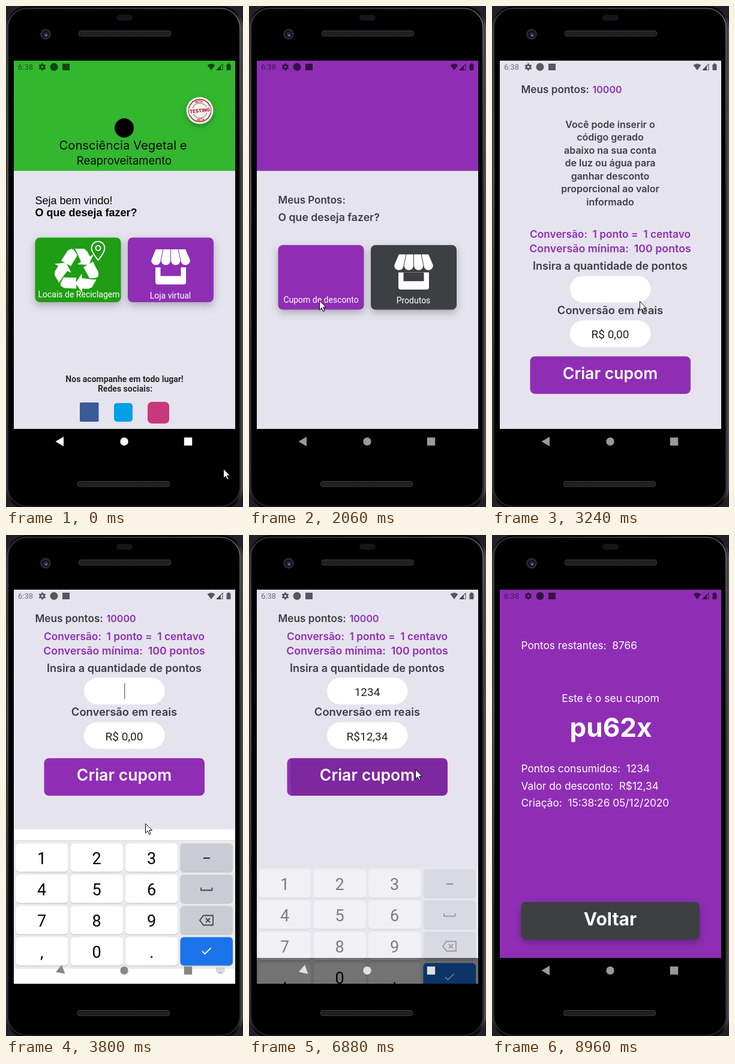
These frames come from a looping animation (395 by 834 pixels, 9.04 s). An HTML page with a canvas:

```html
<!DOCTYPE html>
<html lang="pt-BR">
<head>
<meta charset="utf-8">
<title>Cupom de desconto</title>
<style>
html, body { margin: 0; width: 100%; height: 100%; overflow: hidden; background: #20202a; }
canvas { display: block; }
</style>
</head>
<body>
<canvas id="stage" width="395" height="834"></canvas>
<script>
const stage = document.getElementById('stage');
let c = stage.getContext('2d');
const LOOP = 9040, LEFT = 13, TOP = 91, W = 369, H = 613, BOTTOM = 747;
const PURPLE = '#8f2eb5', GREEN = '#1f9d14', DARK = '#3c4043', PAGE = '#e5e4ee', INK = '#3d3d42';
const POP = 'Inter, sans-serif', ROB = 'Roboto, sans-serif', ARI = '"Liberation Sans", Arial, sans-serif';
const PARAGRAPH = 211.7; // height of the help text hidden while the keyboard is up

const clamp = x => Math.max(0, Math.min(1, x));
const span = (t, a, b) => clamp((t - a) / (b - a));
const lerp = (a, b, k) => a + (b - a) * k;

// cubic-bezier(.208, .82, .25, 1)
function ease(x) {
  if (x <= 0 || x >= 1) return clamp(x);
  const f = (s, a, b) => 3 * a * s * (1 - s) ** 2 + 3 * b * s * s * (1 - s) + s ** 3;
  let lo = 0, hi = 1;
  for (let i = 0; i < 24; i++) {
    const m = (lo + hi) / 2;
    if (f(m, .208, .25) < x) lo = m; else hi = m;
  }
  return f(lo, .82, 1);
}

function text(s, x, y, font, color, align = 'center') {
  c.font = font;
  c.fillStyle = color;
  c.textAlign = align;
  c.fillText(s, x, y);
}
function rect(x, y, w, h, color) {
  c.fillStyle = color;
  c.fillRect(x, y, w, h);
}
function round(x, y, w, h, r, color) {
  c.beginPath();
  c.roundRect(x, y, w, h, r);
  c.fillStyle = color;
  c.fill();
}
function disc(x, y, r, color) {
  c.beginPath();
  c.arc(x, y, r, 0, 7);
  c.fillStyle = color;
  c.fill();
}
function path(points, closed = true) {
  c.beginPath();
  points.forEach(p => c.lineTo(...p));
  if (closed) c.closePath();
}
function line(points, color, width, closed = false) {
  path(points, closed);
  c.strokeStyle = color;
  c.lineWidth = width;
  c.stroke();
}
function poly(points, color) {
  path(points);
  c.fillStyle = color;
  c.fill();
}
function group(draw) {
  c.save();
  draw();
  c.restore();
}
function clip(x, y, w, h, r = 0) {
  c.beginPath();
  c.roundRect(x, y, w, h, r);
  c.clip();
}
function shadow(blur, dy, alpha) {
  c.shadowColor = `rgba(0,0,0,${alpha})`;
  c.shadowBlur = blur;
  c.shadowOffsetY = dy;
}

// Raised button; press = [time since touch, x, y]
function card(x, y, w, h, r, color, press, raised = true) {
  group(() => {
    if (raised) shadow(13, 5, .26);
    round(x, y, w, h, r, color);
  });
  if (press && press[0] > 0) group(() => {
    clip(x, y, w, h, r);
    disc(press[1], press[2], press[0] * 1.39, 'rgba(0,0,0,.12)');
  });
}

function phone() {
  rect(0, 0, 395, 834, '#20202a');
  const rim = c.createLinearGradient(0, 0, 395, 0);
  [[0, '#3c3c3c'], [.01, '#222'], [.025, '#0a0a0a'], [.97, '#0a0a0a'], [.985, '#262626'], [1, '#555']]
    .forEach(s => rim.addColorStop(...s));
  round(0, 0, 395, 838, 36, rim);
  const edge = c.createLinearGradient(0, 0, 300, 400);
  edge.addColorStop(0, '#484848');
  edge.addColorStop(.5, '#8a8a8a');
  edge.addColorStop(1, '#333');
  round(3, 4, 387, 829, 32, '#050505');
  c.strokeStyle = edge;
  c.lineWidth = 1.2;
  c.stroke();
  round(6, 8, 381, 822, 30, '#000');
  round(184, 14.5, 27, 10, 5, '#161618');
  disc(66, 47, 9, '#29292d');
  disc(66, 47, 6, '#10131c');
  disc(66.5, 47.5, 3.5, '#22304f');
  disc(67, 49, 1.3, '#8fa9d8');
  for (const [x, y] of [[121.5, 41.5], [119.5, 791.5]]) {
    round(x, y, 153, 8.5, 3.5, '#191919');
    c.strokeStyle = '#474747';
    c.lineWidth = 1;
    c.stroke();
    for (let i = 4; i < 150; i += 3) rect(x + i, y + 2.5, 1.3, 3.5, '#303030');
  }
}

function badge() {
  const red = '#a3222d';
  group(() => {
    shadow(8, 3, .3);
    disc(323, 174, 22.5, '#f4f2f0');
  });
  group(() => {
    c.translate(323, 174);
    c.rotate(-.1);
    c.strokeStyle = red;
    for (const r of [18.5, 12.5]) {
      c.beginPath();
      c.arc(0, 0, r, 0, 7);
      c.lineWidth = r > 15 ? 1.5 : .8;
      c.stroke();
    }
    text('BETA', 0, -13.2, `700 5px ${ROB}`, red);
    text('BETA', 0, 17, `700 5px ${ROB}`, red);
    rect(-18, -5, 36, 10, '#f4f2f0');
    text('TESTING', 0, 3, `800 8.2px ${ROB}`, red);
  });
}

function recycle(x, y) {
  group(() => {
    c.translate(x, y);
    for (let i = 0; i < 3; i++) {
      poly([[-26, -16], [-15, -33], [-9, -36], [-5, -34], [1, -25], [-10, -7]], '#fff');
      poly([[-3, -36], [12, -36], [17, -32], [22, -23], [28, -27], [20, -9], [1, -10], [7, -14], [2, -26]], '#fff');
      c.rotate(Math.PI * 2 / 3);
    }
  });
}

function pin(x, y) {
  c.beginPath();
  c.arc(x, y, 11, 2.75, .4);
  c.quadraticCurveTo(x + 7, y + 12, x, y + 20);
  c.quadraticCurveTo(x - 7, y + 12, x - 10.2, y + 4.2);
  c.closePath();
  c.strokeStyle = '#fff';
  c.lineWidth = 2;
  c.stroke();
  c.beginPath();
  c.arc(x, y, 4, 0, 7);
  c.stroke();
}

function shop(x, y, back) {
  round(x - 25.5, y + 30, 51, 28.5, [0, 0, 4, 4], '#fff');
  rect(x - 17, y + 30, 34, 14.5, back);
  for (let i = -2; i < 2; i++) {
    const a = x + i * 12.6 + .5, b = a + 11.6, p = x + i * 16.4 + .5, q = p + 15.4;
    c.beginPath();
    c.moveTo(a, y);
    c.lineTo(b, y);
    c.lineTo(q, y + 18);
    c.bezierCurveTo(q, y + 29, p, y + 29, p, y + 18);
    c.fillStyle = '#fff';
    c.fill();
  }
}

function home(t) {
  rect(LEFT, TOP, W, H + 20, PAGE);
  rect(LEFT, TOP, W, 183.5, '#33b72f');
  badge();
  disc(197, 203, 16, '#000');
  text('Consciência Vegetal e', 195, 238.5, `400 20.3px ${POP}`, '#0a0a0a');
  text('Reaproveitamento', 197, 264, `400 18.5px ${POP}`, '#0a0a0a');
  text('Seja bem vindo!', 48.5, 330, `18px ${ARI}`, '#000', 'left');
  text('O que deseja fazer?', 48.5, 350, `700 18px ${ARI}`, '#000', 'left');
  card(48.5, 385.5, 143, 107.5, 8, GREEN);
  recycle(118, 440);
  disc(153, 403, 14, GREEN);
  pin(153.5, 403);
  text('Locais de Reciclagem', 121.5, 485, `14px ${ROB}`, '#fff');
  card(203, 385.5, 143, 107.5, 8, PURPLE, [t - 760, 272, 462]);
  shop(274.5, 405, PURPLE);
  text('Loja virtual', 274, 487, `14px ${ROB}`, '#fff');
  text('Nos acompanhe em todo lugar!', 197.5, 626, `700 14px ${ROB}`, '#2a2a2c');
  text('Redes sociais:', 198.5, 642, `700 14px ${ROB}`, '#2a2a2c');
  round(123, 660, 31.5, 32, 2, '#3a5a98');
  round(180, 661, 31, 31, 5, '#00a0e9');
  round(236, 659, 36, 36, 7, '#c8387c');
}

function store(t) {
  rect(LEFT, TOP, W, H + 20, PAGE);
  rect(LEFT, TOP, W, 183.5, PURPLE);
  text('Meus Pontos:', 48.5, 329, `600 17px ${POP}`, INK, 'left');
  text('O que deseja fazer?', 48.5, 358, `600 17.7px ${POP}`, INK, 'left');
  card(48.5, 398, 143, 107.5, 8, PURPLE, [t - 2230, 117, 490]);
  text('Cupom de desconto', 120, 494, `14px ${ROB}`, '#fff');
  card(203, 398, 143, 107.5, 8, DARK);
  shop(274.5, 413.6, DARK);
  text('Produtos', 274, 494.6, `14px ${ROB}`, '#fff');
}

const HELP = ['Você pode inserir o', 'código gerado', 'abaixo na sua conta', 'de luz ou água para',
  'ganhar desconto', 'proporcional ao valor', 'informado'];
const TYPED = [[5740, '1234'], [5190, '123'], [4730, '12'], [4100, '1'], [3480, '']];

function form(t) {
  const [since, points] = TYPED.find(k => t >= k[0]) || [0, ''];
  const compact = t >= 3710 && t < 6960;
  rect(LEFT, TOP, W, H + 20, PAGE);
  text('Meus pontos:', 48.5, 145, `600 17.2px ${POP}`, INK, 'left');
  text('10000', 167.5, 145, `600 16px ${POP}`, PURPLE, 'left');
  if (!compact) {
    HELP.forEach((s, i) => text(s, 197, 202.5 + i * 21.5, `600 16px ${POP}`, INK));
    c.translate(0, PARAGRAPH);
  }
  text('Conversão:  1 ponto =  1 centavo', 197, 174.5, `600 17.3px ${POP}`, PURPLE);
  text('Conversão mínima:  100 pontos', 197, 198.5, `600 17.8px ${POP}`, PURPLE);
  text('Insira a quantidade de pontos', 197, 227.5, `600 18.1px ${POP}`, INK);
  round(130, 237.5, 134.5, 44.5, 22, '#fff');
  text(points, 197, 267.5, `19px ${ROB}`, '#222');
  if (t >= 3480 && t < 6790 && (t - since) % 1000 < 500) {
    const w = c.measureText(points).width;
    rect(197 + w / 2, 247, points ? 2 : 1.3, 26, points ? '#00897b' : '#666');
  }
  text('Conversão em reais', 197, 301, `600 18.4px ${POP}`, INK);
  round(130, 311.5, 134.5, 44.5, 22, '#fff');
  const reais = points ? 'R$' + (points / 100).toFixed(2).replace('.', ',') : 'R$ 0,00';
  text(reais, 197, 341.5, `19px ${ROB}`, '#222');
  card(63.5, 371.5, 267.5, 62.5, 8, PURPLE, [t - 6730, 277, 400], false);
  text('Criar cupom', 197, 409, `600 26.6px ${POP}`, '#fff');
}

function coupon() {
  rect(LEFT, TOP, W, H, PURPLE);
  const left = (s, y) => text(s, 48.5, y, `400 17.3px ${POP}`, '#fff', 'left');
  left('Pontos restantes:  8766', 190);
  text('Este é o seu cupom', 197.5, 278, `400 17.5px ${POP}`, '#fff');
  text('pu62x', 198, 336, `700 44px ${POP}`, '#fff');
  left('Pontos consumidos:  1234', 395);
  left('Valor do desconto:  R$12,34', 423.5);
  left('Criação:  15:38:26 05/12/2020', 452);
  card(48.5, 611, 297.5, 62.5, 8, DARK);
  text('Voltar', 197, 650, `700 30px ${POP}`, '#fff');
}

// The next page is revealed from below while the old one drifts up and dims
function reveal(p, old, next) {
  const y = H * (1 - p);
  group(() => {
    c.translate(0, -.02 * H * p);
    old();
  });
  rect(LEFT, TOP, W, H, `rgba(0,0,0,${.1 * clamp(p / .36)})`);
  group(() => {
    clip(LEFT, TOP + y, W, H);
    c.translate(0, .041 * y);
    next();
  });
}

function pages(t) {
  if (t < 1061) home(t);
  else if (t < 1486) reveal(ease((t - 1061) / 425), () => home(t), () => store(t));
  else if (t < 2416) store(t);
  else if (t < 2841) reveal(ease((t - 2416) / 425), () => store(t), () => form(t));
  else if (t < 7190) form(t);
  else coupon();
}

function statusBar() {
  const ink = 'rgba(0,0,0,.62)';
  text('6:38', 20, 106, `13px ${ROB}`, 'rgba(0,0,0,.52)', 'left');
  c.beginPath();
  c.arc(60.5, 101.5, 3.2, 0, 7);
  c.strokeStyle = ink;
  c.lineWidth = 2.8;
  c.stroke();
  for (let i = 0; i < 6; i++) group(() => {
    c.translate(60.5, 101.5);
    c.rotate(i * Math.PI / 3);
    rect(-1.3, -6, 2.6, 1.6, ink);
  });
  disc(80, 101.5, 6.5, ink);
  rect(94, 96, 12, 11, ink);
  c.beginPath();
  c.moveTo(342, 107);
  c.lineTo(335.5, 98.5);
  c.quadraticCurveTo(342, 93.5, 348.5, 98.5);
  c.fillStyle = ink;
  c.fill();
  line([[351.5, 106.3], [361, 106.3], [361, 96.8]], ink, 1.1, true);
  poly([[351, 107], [358, 107], [358, 99.5]], ink);
  round(367.5, 97, 7, 10, 1, ink);
  rect(369.5, 95.5, 3, 1.5, ink);
}

// The keys are painted once on their own layer so that they fade as a whole
function paintKeys() {
  const layer = document.createElement('canvas'), screen = c;
  layer.width = stage.width;
  layer.height = stage.height;
  c = layer.getContext('2d');
  rect(LEFT, 490, W, 214, '#e8eaed');
  rect(LEFT, 490, W, 1, '#dcdde2');
  ['123-', '456_', '789<', ',0.+'].forEach((row, j) => [...row].forEach((ch, i) => {
    const x = 16 + i * 91.5, y = 495.5 + j * 52, mid = x + 43.7, ok = ch === '+';
    round(x, y + 1, 87.5, 47.5, 6, '#c5c7cc');
    round(x, y, 87.5, 47.2, 6, ok ? '#1a73e8' : i === 3 ? '#cbccd3' : '#fff');
    if (i < 3) text(ch, mid, y + 34, `27px ${ROB}`, '#000');
  }));
  rect(329, 519, 11, 2, '#222');
  line([[325, 569], [325, 573.5], [343.5, 573.5], [343.5, 569]], '#444', 1.8);
  line([[323, 623.5], [329, 615.5], [345, 615.5], [345, 631.5], [329, 631.5]], '#444', 1.8, true);
  line([[333, 620], [340, 627]], '#444', 1.8);
  line([[340, 620], [333, 627]], '#444', 1.8);
  line([[327, 675], [331.5, 679.5], [341.5, 669.5]], '#fff', 1.8);
  c = screen;
  return layer;
}
const keys = paintKeys();

function keyboard(t) {
  if (t < 3710 || t > 6970) return;
  const closing = t >= 6790, k = closing ? (t - 6790) / 180 : clamp((t - 3710) / 300);
  if (!closing) rect(LEFT, 490, W, BOTTOM - 490, '#fff');
  c.globalAlpha = closing ? clamp(1 - 1.1 * k) : clamp(k * 4);
  c.drawImage(keys, 0, closing ? 122 * k : 52 * (1 - k) ** 3);
}

function navBar(t) {
  const up = t >= 3710 && t < 6790;
  let v = lerp(255, 154, span(t, 800, 1430));
  if (up) v = 134;
  else if (t >= 6790) v = lerp(235, 154, span(t, 6860, 7040));
  const color = `rgb(${v},${v},${v})`;
  const turn = t < 6790 ? span(t, 3710, 4110) : 1 - span(t, 6790, 6906);
  group(() => {
    c.translate(90, 725);
    c.rotate(-turn * Math.PI / 2);
    poly([[-7.5, 0], [6, -8], [6, 8]], color);
  });
  disc(197, 725, 6.7, color);
  rect(296.8, 718.3, 13.4, 13.4, color);
  if (t >= 3480 && t < 6790) {
    for (let j = 0; j < 3; j++)
      for (let i = 0; i < 6; i++) rect(350 + i * 2.5, 720.5 + j * 2.5, 1.4, 1.4, color);
    rect(353, 728, 8, 1.4, color);
  }
}

const MOVES = [
  [0, 362, 770], [70, 362, 770], [700, 272, 462], [910, 272, 462], [1140, 279, 546],
  [1830, 126, 510], [1910, 126, 510], [2060, 117, 490], [2230, 117, 490], [2550, 256, 611],
  [3080, 263, 505], [3160, 263, 505], [3310, 232, 480], [4420, 232, 480], [4730, 328, 280],
  [6030, 328, 280], [6150, 332, 290], [6420, 277, 390], [7570, 277, 390], [8050, 374, 650],
  [8410, 353, 820], [8490, 353, 820], [8560, 347, 833], [8900, 347, 833], [8960, 347, 840], [LOOP, 347, 840]];

function pointer(t) {
  const i = MOVES.findIndex(m => m[0] > t), [a, x0, y0] = MOVES[i - 1], [b, x1, y1] = MOVES[i];
  const s = span(t, a, b), k = s * s * (3 - 2 * s);
  c.translate(lerp(x0, x1, k) + .5, lerp(y0, y1, k) + .5);
  const arrow = [[0, 0], [0, 15.5], [3.6, 12.2], [6.2, 18], [8.6, 17], [6.1, 11.2], [11, 11.2]];
  poly(arrow, '#fff');
  line(arrow, '#000', 1, true);
}

function draw(t) {
  phone();
  group(() => {
    clip(LEFT, TOP, W, BOTTOM - TOP);
    rect(LEFT, TOP, W, BOTTOM - TOP, '#000');
    group(() => {
      clip(LEFT, TOP, W, H);
      pages(t);
    });
    group(() => keyboard(t));
    statusBar();
    navBar(t);
  });
  group(() => pointer(t));
}

let start;
function tick(now) {
  start ??= now;
  draw(Math.max(0, now - start) % LOOP);
  requestAnimationFrame(tick);
}
requestAnimationFrame(tick);
</script>
</body>
</html>
```
